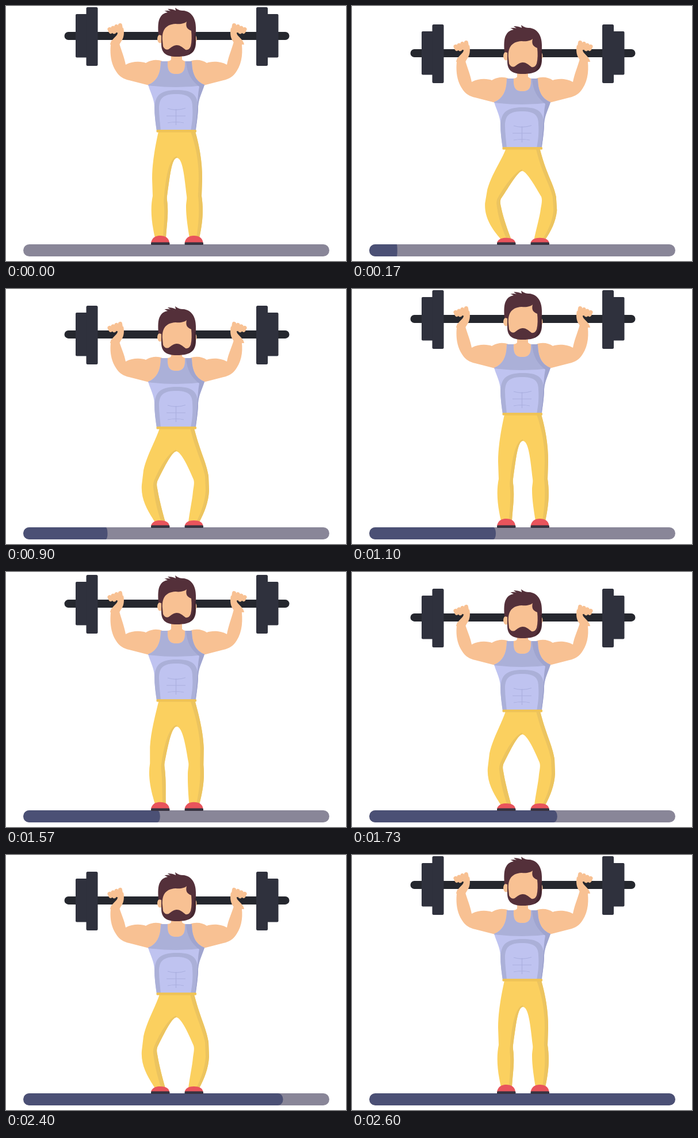
An HTML page for the animation above (3030 ms loop, 591 by 443 pixels).

```html
<!DOCTYPE html>
<html lang="en">
<head>
<meta charset="utf-8">
<title>Barbell squats</title>
<style>
  html, body { margin: 0; width: 100%; height: 100%; overflow: hidden; background: #fff; }
  svg { display: block; width: 100%; height: 100%; }
  .skin { fill: #f8c193; }
  .iron { fill: #2f313d; }
  .hair { fill: #54303a; }
  .fingers { fill: none; stroke: #f8c193; stroke-width: 7; stroke-linecap: round; }
  .shade { fill: #abb0d8; }
  .abs { fill: none; stroke: #abb0e0; stroke-width: 1.2; }
</style>
</head>
<body>
<svg viewBox="0 0 591 443">
  <defs>
    <clipPath id="trackClip"><rect x="30" y="414" width="532" height="21" rx="10.5"/></clipPath>
    <clipPath id="shirtClip"><path id="shirtShape" d="M269 96L281 96C280 112 284 118 296 118C308 118 312 112 311 96L323 96C323 118 330 131 345 137C341 150 335 160 334 174C334 190 331 204 330 217L262 217C260 204 258 190 258 174C257 160 251 150 247 137C262 131 269 118 269 96Z"/></clipPath>
    <g id="hand">
      <path class="skin" d="M181 67C182 60 188 56 193 50L196 42L204 38C206 46 205 56 200 62L197 67Z"/>
      <path class="fingers" d="M180 40.500L182 44.500M186 38L188 45M192 35.500L194 43M198.500 33.500L200.500 45"/>
    </g>
  </defs>

  <g clip-path="url(#trackClip)">
    <rect x="30" y="414" width="532" height="21" fill="#898698"/>
    <rect id="fill" x="30" y="414" height="21" ry="10.5" fill="#4b5075"/>
  </g>

  <g id="bar">
    <rect x="101.500" y="45" width="391" height="14" rx="7" fill="#25272e"/>
    <g class="iron">
      <rect x="121" y="14" width="21" height="75.500" rx="2"/>
      <rect x="139.500" y="2" width="20" height="102" rx="2.500"/>
      <rect x="453" y="14" width="20.500" height="75.500" rx="2"/>
      <rect x="435" y="2" width="20" height="102" rx="2.500"/>
    </g>
  </g>

  <path id="pants" fill="#fbd05f"/>
  <path id="innerShade" fill="#ecc45f"/>
  <path id="outerShade" fill="#ecc45f"/>
  <g id="shoes">
    <path class="shoe" fill="#e8545c"/>
    <rect x="252" y="410.500" width="32.500" height="4.500" rx="1.500" fill="#373340"/>
    <g transform="translate(58.500)">
      <path class="shoe" fill="#e8545c"/>
      <rect x="252" y="410.500" width="32.500" height="4.500" rx="1.500" fill="#373340"/>
    </g>
  </g>

  <path class="arm skin"/>
  <path class="arm skin" transform="translate(592) scale(-1 1)"/>
  <g id="hands">
    <use href="#hand"/>
    <use href="#hand" transform="translate(595) scale(-1 1)"/>
  </g>

  <g id="torso">
    <path class="skin" d="M287 78L306 78L306 93C308 95 310 96 313 96L313 120L279 120L279 96C283 96 286 95 287 93Z"/>
    <use href="#shirtShape" fill="#bfc3f0"/>
    <g clip-path="url(#shirtClip)">
      <path class="shade" d="M240 90L350 90L350 137Q296 145 240 137Z"/>
      <path class="shade" d="M258 217L258 180C258 154 270 146 296 146C322 146 333 152 334 176L330 217L321 217C324 200 325 190 324 174C324 158 314 153 296 153C276 153 266 158 266 178C266 192 268 204 269 217Z"/>
      <path fill="#a0a5cf" d="M313 96L325 96L350 130L328 220L328 217C333 190 332 160 336 140C322 130 314 115 313 96Z"/>
    </g>
    <path class="abs" d="M295.500 179V207M281 178Q296 183 312 177.500M279 191H312M281 203Q296 200 309 203"/>
    <rect x="261.500" y="215" width="69.500" height="4.500" rx="1.500" fill="#efc356"/>
  </g>

  <g id="head">
    <ellipse class="skin" cx="268" cy="57" rx="5" ry="7.500"/>
    <ellipse class="skin" cx="327.500" cy="57" rx="4" ry="7"/>
    <path class="hair" d="M265 50C264 38 264 26 268 20C271 14 276 12 281 11L275.500 8.500C279 7.500 283 8 286 8.500C283 7 282 6 281 5C287 5 291 6 295 8L294 3C299 7 303 8 308 8C322 9 330 21 330 38L330 60C331 80 322 88 297 88C276 88 270 80 270 66L270 51Z"/>
    <path fill="#43262f" d="M330 47L327.500 47C327 62 325 75 317 84.500C328 80 330 70 330 47Z"/>
    <path class="skin" d="M272 60C271 45 275 32 295 31C304 32 311 30 314 27C312 35 314 40 322 43C323 52 323 62 321 70C319 75 316 77 312 76C306 71 302 68 297 68C291 68 287 72 283 75C278 77 275 74 273 70Z"/>
  </g>
</svg>

<script>
const LOOP = 3030;
const REP_FRAMES = 10;
const repStarts = [0, 23, 46, 68];
const fillStops = [0, 97.5, 220, 398, 532];
const DROP = 30;

// Each pair: standing pose, and the pose at 80% depth.
const poses = {
  pants: [
    "M265 218C258 250 254 275 254 300L255 330C251 350 252 372 259 403L278 403C279 385 282 365 281 350C281 340 279 336 280 330C285 295 288 264 297 264C307 264 310 295 314 330C315 336 313 340 313 350C313 365 316 385 319 403L336 403C343 372 343 350 340 330L341 300C341 275 338 250 329 218Z",
    "M267 242C259 266 245 288 239 315L236 340C234 365 246 385 259 405L277 405C272 388 267 368 264 352C263 344 261 341 263 334C272 316 288 282 296 282C305 283 318 312 326 331C328 337 326 344 325 352C324 365 319 388 317 405L336 405C345 388 352 370 353 350L352 325C348 300 338 285 327 242Z"
  ],
  innerShade: [
    "M297 264C288 264 285 295 280 330C279 336 281 340 281 350C282 365 279 385 278 403L273 403C274 385 276 365 275 350C274 340 274 336 275 330C278 295 284 264 297 261Z",
    "M296 282C288 282 272 316 263 334C261 341 263 344 264 352C267 368 272 388 277 405L270 405C264 388 259 368 257 352C256 344 255 341 257 334C266 312 282 284 296 279Z"
  ],
  outerShade: [
    "M329 218C338 250 341 275 341 300L340 330C343 350 343 372 336 403L331 403C336 372 336 350 334 330L335 300C335 275 332 250 321 218Z",
    "M327 242C338 285 348 300 352 325L353 350C352 370 345 388 336 405L331 405C339 388 346 370 347 350L346 325C341 300 331 285 320 242Z"
  ],
  shoe: [
    "M252 411C254 403 259 399 268 399C277 399 283 403 284 411Z",
    "M252 411C254 405 259 402 268 402C277 402 283 405 284 411Z"
  ]
};
const armPath = "M272 96C262 92 250 94 243 99C236 96 220 95 208 102C206 90 200 76 196 62L183 60C180 78 181 98 191 113C197 123 205 127 214 129L249 138C263 132 270 118 272 96Z";

const $ = s => document.querySelector(s);
const $$ = s => document.querySelectorAll(s);
const clamp = v => Math.min(1, Math.max(0, v));
const smooth = v => v * v * (3 - 2 * v);
const moveY = (id, y) => $(id).setAttribute("transform", `translate(0 ${y})`);

function mix([from, to], k) {
  const ends = to.match(/[\d.]+/g);
  let i = 0;
  return from.replace(/[\d.]+/g, n => +n + (ends[i++] - n) * k);
}

// Wrists follow the bar, shoulders and elbows follow the torso.
function bendArm(bodyY, barY) {
  return armPath.replace(/(\d+) (\d+)/g, (_, x, y) => {
    const w = clamp((y - 62) / 30);
    return `${x} ${+y + barY + (bodyY - barY) * w}`;
  });
}

function frameAt(t) {
  let n = Math.ceil(t * 0.03);
  while (Math.round(n / 0.3) * 10 > t) n--;
  return n;
}

function draw(frame) {
  let rep = 0;
  while (rep < 3 && frame >= repStarts[rep + 1]) rep++;
  const p = clamp((frame - repStarts[rep]) / REP_FRAMES);
  const depth = 1 - Math.abs(2 * p - 1);
  const bodyY = DROP * depth;
  const barY = DROP * smooth(depth);

  const width = fillStops[rep] + (fillStops[rep + 1] - fillStops[rep]) * p;
  $("#fill").setAttribute("width", width);
  $("#fill").setAttribute("rx", 10.5 * width / 532);

  moveY("#torso", bodyY);
  for (const id of ["#bar", "#head", "#hands"]) moveY(id, barY);

  for (const id of ["pants", "innerShade", "outerShade"]) {
    $("#" + id).setAttribute("d", mix(poses[id], depth / 0.8));
  }
  const shoe = mix(poses.shoe, depth / 0.8);
  $$(".shoe").forEach(el => el.setAttribute("d", shoe));
  const arm = bendArm(bodyY, barY);
  $$(".arm").forEach(el => el.setAttribute("d", arm));
}

const start = performance.now();
function tick() {
  draw(frameAt((performance.now() - start) % LOOP));
  requestAnimationFrame(tick);
}
tick();
</script>
</body>
</html>
```
